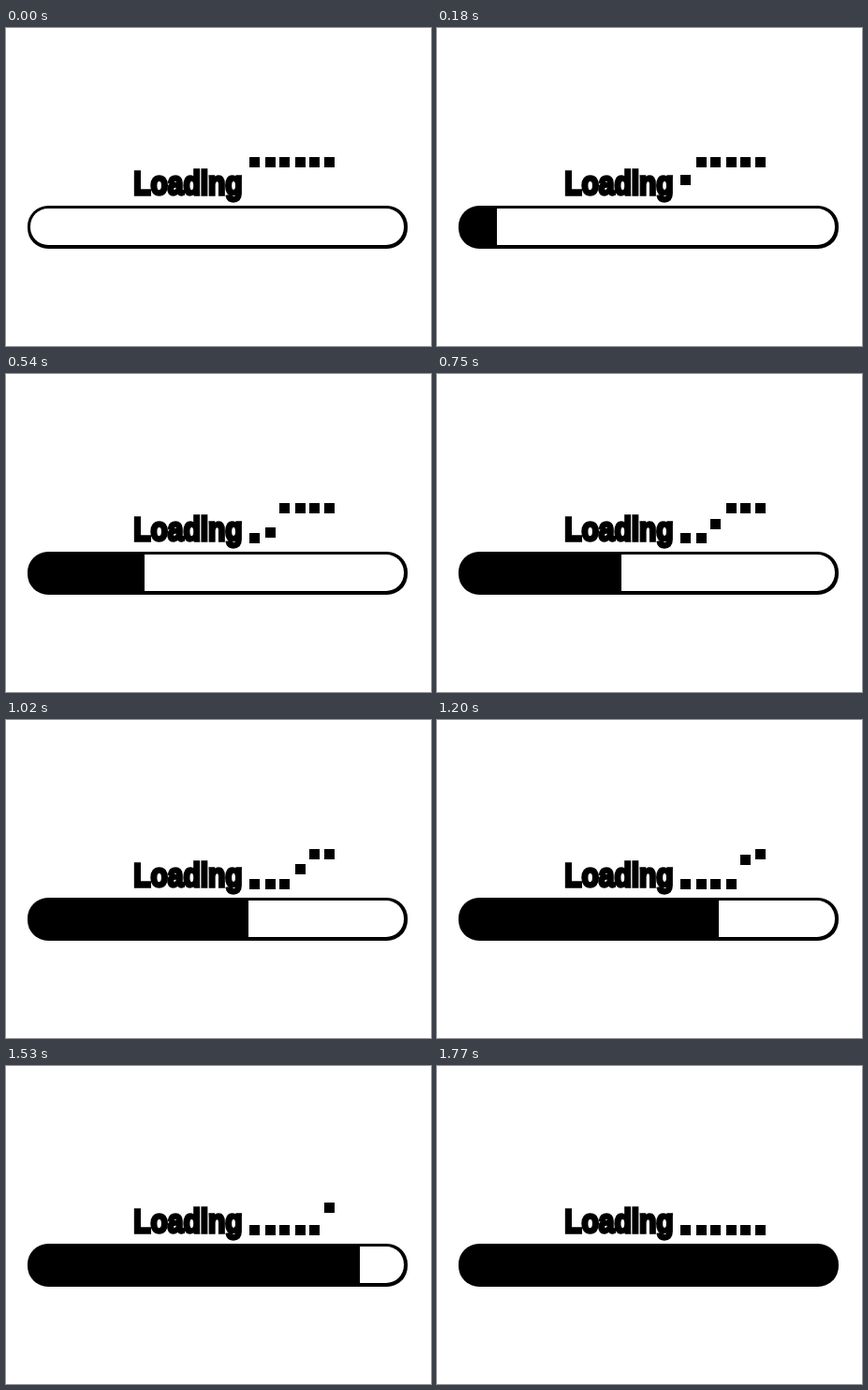
Recreate the animation shown at these times as an HTML page. Size 454 by 340 pixels, loop 1.8 s.

```html
<!DOCTYPE html>
<html lang="en">
<head>
<meta charset="utf-8">
<title>Loading</title>
<style>
  html, body { margin: 0; width: 100%; height: 100%; overflow: hidden; background: #fff; }
  svg { display: block; width: 100%; height: 100%; }
  text {
    font: bold 36px "Liberation Sans", Arial, sans-serif;
    stroke: #000; stroke-width: 3.4; stroke-miterlimit: 2;
  }
</style>
</head>
<body>
<svg viewBox="0 0 454 340">
  <clipPath id="rest"><rect id="gap" y="190" width="454" height="46"/></clipPath>
  <text transform="translate(136.2 178.3) scale(.832 1)">Loading</text>
  <g id="dots" shape-rendering="crispEdges"></g>
  <rect x="23" y="190" width="406" height="46" rx="22"/>
  <rect x="26" y="193" width="399" height="39" rx="19" fill="#fff" clip-path="url(#rest)"/>
</svg>
<script>
  const STEP = 30, LOOP = 1800;
  const TOP = 138, DROP = 32, SPEED = 3.2;   // pixels, pixels per step
  const gap = document.getElementById('gap');

  // x position and the step at which each square starts to fall
  const dots = [[260, 0], [277, 9.8], [292, 19.7], [309, 29], [324, 38], [340, 48.6]]
    .map(([x, start]) => {
      const el = document.createElementNS('http://www.w3.org/2000/svg', 'rect');
      el.setAttribute('x', x);
      el.setAttribute('width', 11);
      el.setAttribute('height', 11);
      document.getElementById('dots').append(el);
      return { el, start };
    });

  function draw(now) {
    const n = Math.floor(now % LOOP / STEP);
    gap.setAttribute('x', Math.round(22.3 + 6.974 * n));
    for (const { el, start } of dots) {
      const fall = Math.min(DROP, Math.max(0, (n - start) * SPEED));
      el.setAttribute('y', Math.round(TOP + fall));
    }
  }

  const begin = performance.now();
  function tick() {
    draw(performance.now() - begin);
    requestAnimationFrame(tick);
  }
  tick();
</script>
</body>
</html>
```
